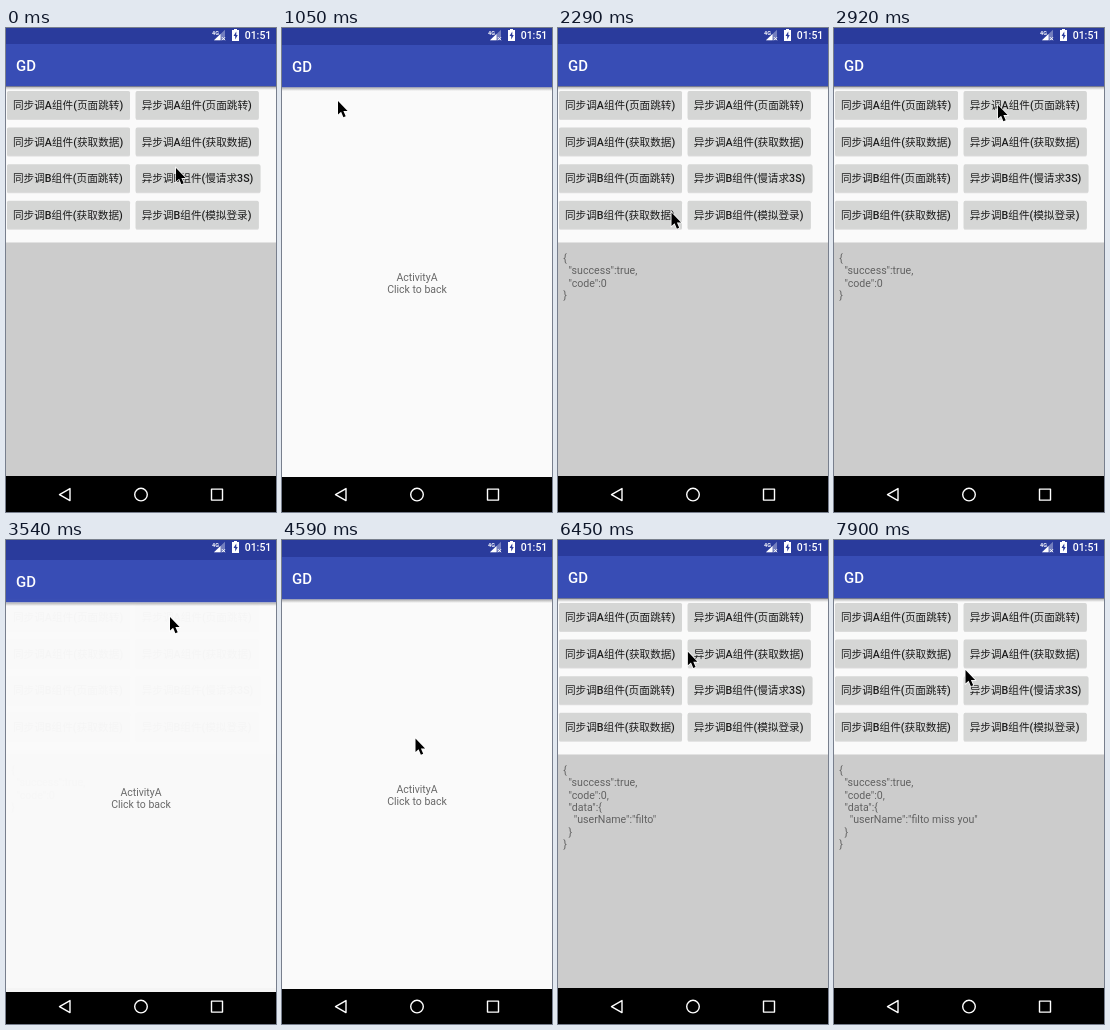
An HTML page that plays this animation: 270x484 px, repeating every 8000 ms.

```html
<!DOCTYPE html>
<html lang="zh-CN">
<head>
<meta charset="utf-8">
<style>
  html, body { margin: 0; width: 100%; height: 100%; overflow: hidden; background: #000; }
  svg { display: block; width: 100%; height: 100%; }
  text { font: 10.5px Roboto, "Noto Sans CJK SC", "Noto Sans CJK", sans-serif; white-space: pre; }
  .title { font-size: 15px; font-weight: 500; fill: #fff; }
  .clock { font-weight: 500; }
  .network { font-size: 5.5px; font-weight: 700; }
  .label { font-size: 10.63px; font-weight: 500; fill: #1c1c1c; }
  .body { fill: #686868; }
  .result { font-size: 10.63px; fill: #626262; }
  .line { fill: none; stroke: #fff; stroke-width: 1.4; stroke-linejoin: round; }
</style>
</head>
<body>
<svg viewBox="0 0 270 484">
  <defs>
    <linearGradient id="shade" x2="0" y2="1">
      <stop stop-color="#000" stop-opacity=".3"/>
      <stop offset="1" stop-color="#000" stop-opacity="0"/>
    </linearGradient>
    <g id="chrome">
      <rect y="-8" width="270" height="24" fill="#2a3b9c"/>
      <rect y="16" width="270" height="42.5" fill="#384db5"/>
      <rect y="58.5" width="270" height="389.5" fill="#fafafa"/>
      <rect y="58.5" width="270" height="3.5" fill="url(#shade)"/>
      <text class="title" x="10" y="43">GD</text>
    </g>
    <clipPath id="secondRow"><path d="M1 99.6H124V127.6H1ZM129.7 99.6H252.7V127.6H129.7Z"/></clipPath>
  </defs>
  <rect width="270" height="484"/>

  <g id="home">
    <use href="#chrome"/>
    <rect y="214.5" width="270" height="233.5" fill="#ccc"/>
    <g id="buttons"></g>
    <g clip-path="url(#secondRow)"><circle id="ripple" cy="114" opacity=".07"/></g>
    <g id="result"></g>
  </g>

  <g id="activity">
    <use href="#chrome"/>
    <rect y="448" width="270" height="8"/>
    <g text-anchor="middle">
      <text class="body" x="135" y="251.5">ActivityA</text>
      <text class="body" x="135" y="264">Click to back</text>
    </g>
  </g>

  <g fill="#fff">
    <text class="network" x="206" y="6.7">4G</text>
    <path d="M208 12.2 219 1.7V12.2Z" opacity=".35"/>
    <path d="M208 12.2 214.5 6V12.2Z"/>
    <path class="line" d="m216 9.2 3 3m0-3-3 3" style="stroke-width:1"/>
    <path d="M228 2V1h3V2h2V13H226V2Z"/>
    <path d="M230.3 3.5 227.5 8H229.2V11.5L231.8 6.9H230.3Z" fill="#2a3b9c"/>
    <text class="clock" x="238.7" y="11.2">01:51</text>
  </g>
  <path class="line" d="M53.5 466.6 64 460.6V472.6Z"/>
  <circle class="line" cx="135" cy="466.6" r="6.3"/>
  <rect class="line" x="205.5" y="461.1" width="11" height="11"/>

  <path id="cursor" d="M0 0V13.6L3.1 10.8 5.4 16.2 7.7 15.2 5.4 10H9.6Z" stroke="#fff" stroke-width="1.4" paint-order="stroke"/>
</svg>
<script>
const LOOP = 8000;
const get = id => document.getElementById(id);

function set(node, attrs) {
  for (const key in attrs) node.setAttribute(key, attrs[key]);
}

function add(parent, tag, attrs, content = '') {
  const node = document.createElementNS('http://www.w3.org/2000/svg', tag);
  set(node, attrs);
  node.textContent = content;
  parent.append(node);
}

function addButton(x, y, width, label) {
  const shape = { x, width, height: 28, rx: 1.5 };
  add(get('buttons'), 'rect', { ...shape, y: y + 1, opacity: .12 });
  add(get('buttons'), 'rect', { ...shape, y, fill: '#d5d6d5' });
  add(get('buttons'), 'text', { class: 'label', x: x + 6, y: y + 18 }, label);
}

[
  ['A组件(页面跳转)', 'A组件(页面跳转)'],
  ['A组件(获取数据)', 'A组件(获取数据)'],
  ['B组件(页面跳转)', 'B组件(慢请求3S)'],
  ['B组件(获取数据)', 'B组件(模拟登录)']
].forEach(([sync, async], row) => {
  const y = 63 + row * 36.6;
  addButton(1, y, 123, '同步调' + sync);
  addButton(129.7, y, row === 2 ? 124.7 : 123, '异步调' + async);
});

const withUser = name =>
  `{\n  "success":true,\n  "code":0,\n  "data":{\n    "userName":"${name}"\n  }\n}`;

// Each timeline entry is [start in ms, ...values], held until the next one.
const results = [
  [0, ''],
  [2290, '{\n  "success":true,\n  "code":0\n}'],
  [5840, withUser('filto')],
  [7290, withUser('filto miss you')]
];
// Opacity and downward offset of the second screen.
const screens = [
  [0, 0, 0],
  [1050, 1, 1], [1250, 1, 0], [2290, 0, 0],
  [3540, .98, 4], [3750, 1, 0], [4590, 1, 1], [4790, 0, 0]
];
// Centre x and radius of the touch ripple.
const ripples = [
  [0, 0, 0],
  [5840, 53, 49], [6250, 0, 0],
  [7290, 178, 56], [7490, 184, 67], [7900, 0, 0]
];
const at = (timeline, t) => timeline.findLast(([start]) => start <= t).slice(1);

// Pointer moves: start, number of visible steps, destination.
const STEP = 205;
const moves = [
  [210, 3, 56, 73],
  [1460, 3, 113.5, 184.5],
  [2710, 2, 164, 77],
  [3960, 2, 133.5, 198.5],
  [5000, 3, 41, 119],
  [6245, 4, 164, 109],
  [7900, 1, 131.5, 130]
];
const easeOut = p => 1 - (1 - p) ** 1.85;

function pointerAt(t) {
  let x = 170, y = 140;
  for (const [start, steps, toX, toY] of moves) {
    if (t < start) break;
    const step = Math.min(steps, Math.floor((t - start) / STEP) + 1);
    const p = easeOut(step / steps);
    x += (toX - x) * p;
    y += (toY - y) * p;
  }
  return [x, y];
}

let shownResult = '';
function showResult(value) {
  if (value === shownResult) return;
  shownResult = value;
  get('result').replaceChildren();
  value.split('\n').forEach((line, i) =>
    add(get('result'), 'text', { class: 'result', x: 5.3, y: 233.8 + i * 12.35 }, line));
}

function draw(now) {
  const t = now % LOOP;
  const [opacity, offset] = at(screens, t);
  const [cx, r] = at(ripples, t);
  set(get('activity'), { opacity, transform: `translate(0 ${offset})` });
  set(get('ripple'), { cx, r });
  set(get('cursor'), { transform: `translate(${pointerAt(t)})` });
  showResult(at(results, t)[0]);
  requestAnimationFrame(draw);
}

draw(performance.now());
</script>
</body>
</html>
```
